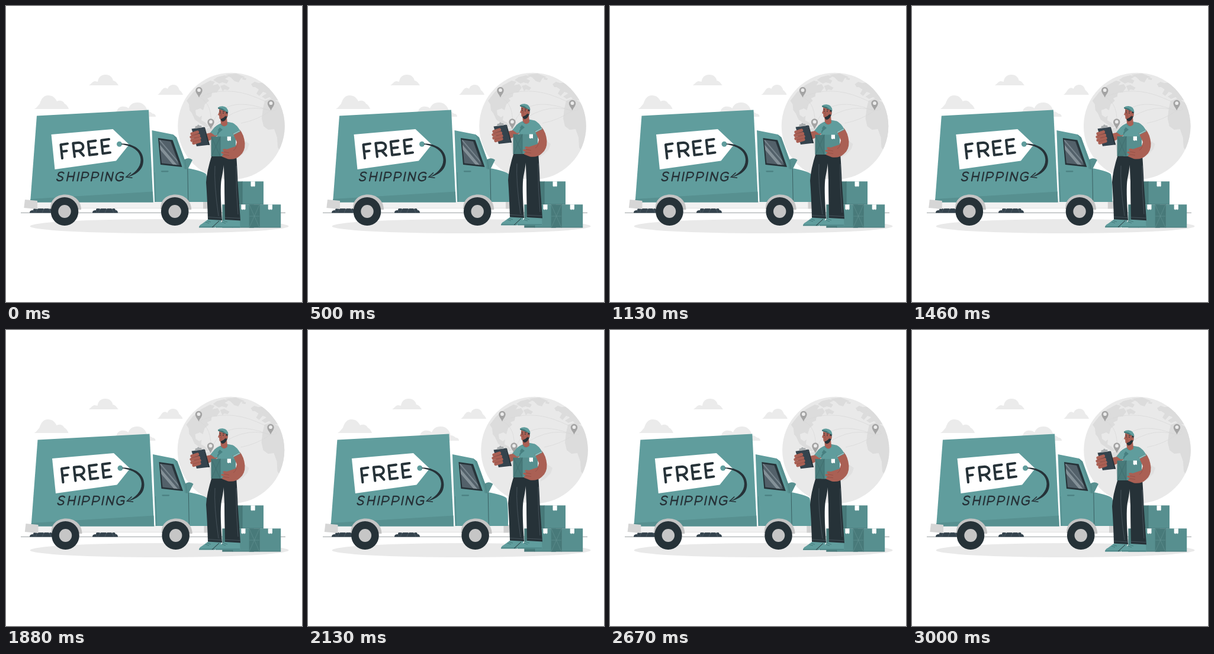
These frames come from a looping animation (500x500 px, 3.04 s). An HTML page with a canvas:

```html
<!DOCTYPE html>
<html lang="en">
<head>
<meta charset="utf-8">
<title>Free shipping</title>
<style>
html, body { margin: 0; width: 100%; height: 100%; overflow: hidden; background: #fff; }
canvas { display: block; width: 100vw; height: 100vh; }
</style>
</head>
<body>
<canvas id="stage" role="img" aria-label="FREE SHIPPING: delivery truck and courier"></canvas>
<script>
const canvas = document.getElementById('stage');
const ctx = canvas.getContext('2d');
const scale = Math.max(1, window.devicePixelRatio || 1);
canvas.width = canvas.height = 500 * scale;

const TEAL = '#609d9d', TEAL_DIM = '#579090', BOX = '#578f8f', BOX_SIDE = '#487a7a';
const INK = '#263238', SKIN = '#aa6054', SKIN_DIM = '#8e4b42';
const PALE = '#ebebeb', LAND = '#dcdcdc', CHROME = '#c4c4c4';
const LOOP = 3040, FPS = 24;

const paths = new Map();
function path(d) {
  if (!paths.has(d)) paths.set(d, new Path2D(d));
  return paths.get(d);
}
function fill(color, d) {
  ctx.fillStyle = color;
  ctx.fill(path(d));
}
function line(color, width, d) {
  ctx.strokeStyle = color;
  ctx.lineWidth = width;
  ctx.stroke(path(d));
}
function oval(color, x, y, rx, ry = rx) {
  ctx.fillStyle = color;
  ctx.beginPath();
  ctx.ellipse(x, y, rx, ry, 0, 0, Math.PI * 2);
  ctx.fill();
}
function rect(color, x, y, w, h) {
  ctx.fillStyle = color;
  ctx.fillRect(x, y, w, h);
}
function shifted(x, y, draw) {
  ctx.save();
  ctx.translate(x, y);
  draw();
  ctx.restore();
}

// Sideways shake in ten equal linear steps
const SHAKE = [0, -1, 2, -3, 3, -3, 3, -3, 2, -1, 0];
function shake(t, period) {
  const p = (t % period) / period * 10, i = Math.floor(p);
  return SHAKE[i] + (SHAKE[i + 1] - SHAKE[i]) * (p - i);
}
function bob(t) {
  const p = (t % 1500) / 1500;
  return -6 * (1 - Math.abs(1 - 2 * p));
}

function pin(x, y) {
  shifted(x, y, () => {
    fill('#a3a3a3', 'M0 12C-2 7-5.7 4-5.7 0A5.7 5.7 0 0 1 5.7 0C5.7 4 2 7 0 12Z');
    oval(PALE, 0, -.3, 2.9);
  });
}

function globe() {
  oval('#e9e9e9', 380.5, 203, 90.3);
  ctx.save();
  ctx.beginPath();
  ctx.arc(380.5, 203, 90.3, 0, Math.PI * 2);
  ctx.clip();
  fill(LAND, 'M305 160L316 146 330 134 345 126 353 128 349 134 358 132 362 138 356 146 348 146 347 153 340 156 343 160 336 166 333 176 328 173 320 176 321 184 327 188 331 185 330 193 337 197 343 204 338 205 329 199 319 192 314 181 310 176 309 166Z');
  fill(LAND, 'M350 125L357 120 369 117 377 119 370 123 376 126 373 131 365 129 360 131ZM362 135L369 133 378 138 375 142 369 141 366 144ZM371 116L389 114 404 120 397 122 393 129 386 127 380 121Z');
  fill(LAND, 'M336 208L348 204 363 210 376 219 373 232 362 244 357 262 347 254 344 233Z');
  fill(LAND, 'M400 121l6 1-1 3-6-1ZM414 132L420 128 429 131 436 139 444 143 440 147 434 145 428 152 423 148 427 141 421 137 417 137Z');
  fill(LAND, 'M427 130L437 129 451 147 460 159 453 159 445 154 438 157 432 153 440 148Z');
  fill(LAND, 'M437 160L449 156 461 163 474 182 475 224 464 246 459 239 458 222 453 208 443 209 435 203 432 190 434 173Z');
  fill('#e0e0e0', 'M394 233L404 228 411 233 408 242 399 251 391 256Z');
  line('#d7d7d7', .7, 'M326 154Q372 133 424 155T447 177M346 207Q363 145 447 177M346 207Q398 160 447 177M326 154Q350 164 346 207M397 198Q424 193 447 177');
  ctx.restore();
  pin(326, 142.5);
  pin(447.5, 164.5);
  pin(346, 196);
}

function clouds() {
  const main = 'M0 23C4 21 6 17 9 14C12 5 16 0 23 0C31 0 35 4 38 10C44 7 49 10 51 14C55 16 57 20 58 23Z';
  shifted(48, 151, () => fill(PALE, main));
  fill(PALE, 'M140 134C144 132 145 128 150 127C152 127 154 128 155 128C156 120 161 116 168 116C176 116 180 121 181 126C186 127 188 131 190 134Z');
  fill(PALE, 'M256 150C260 148 261 144 264 141C267 137 271 138 273 140C275 135 278 133 283 133C289 133 292 138 293 142C296 144 298 147 299 150Z');
  fill(PALE, 'M176 187C181 181 184 179 187 178C189 171 195 169 200 170C203 170 205 171 207 173C209 167 214 163 222 163C231 163 237 169 239 178C244 178 246 181 248 182C251 182 253 184 253 187Z');
}

function shrub(x) {
  shifted(x, 349, () => {
    fill('#34434d', 'M0 .5C0-3 2-4 6-4C6-7 8-8.5 11-8L13-6 16-8H22L24-6 26-8H31L33-6 36-8C38-7 39-5 39-4C42-4 43-2 43 .5Z');
    line('#63717b', .5, 'M6-4L8 0M13-6L10 0M24-6L21 0M33-6L36 0');
  });
}

function ground() {
  oval('#e9e9e9', 259, 372, 218.5, 12);
  line('#7d8488', .8, 'M25 349.3H472');
  shrub(40);
  shrub(146);
}

function wheel(x) {
  fill(CHROME, `M${x - 24} 343C${x - 25} 327 ${x - 13} 318.5 ${x + 1} 318.5C${x + 17} 318.5 ${x + 28} 330 ${x + 28} 344H${x + 20}Z`);
  oval(INK, x, 347, 23.3, 24);
  oval('#c6c6c6', x, 347, 10.7, 11);
}

function lettering() {
  ctx.lineCap = ctx.lineJoin = 'round';
  line(INK, 4.1, 'M104 232.5L92.5 234.3 95 257.2M93.8 246L102.5 244.7' +
    'M116 254.8L113.3 231.9 121 231C132 229.5 134 243 123.5 244.5L115 245.4M123.5 244.5L131 252.7' +
    'M151.5 227.6L138.7 229.2 141.2 251.8 154 250.1M140 240.3L150.5 239' +
    'M174 225L161.2 226.7 163.6 249.2 176 247.5M162.4 237.8L172.8 236.4');
  ctx.save();
  ctx.transform(1, 0, -.2, 1, 59.1, 0);
  line(INK, 2.3, 'M95 282.5C92 279.5 86 280.5 86 284.3C86 289 95 286.7 95 291.5C95 296 88 296.3 85.5 292.8' +
    'M103 280.8V295.3M113 280.8V295.3M103 288H113M120.5 280.8V295.3' +
    'M127 295.3V280.8H132C139 280.8 139 289.8 132 289.8H127' +
    'M144 295.3V280.8H149C156 280.8 156 289.8 149 289.8H144' +
    'M160.8 280.8V295.3M168 295.3V280.8L178 295.3V280.8' +
    'M196 283C192 279 184.5 281 184.5 288C184.5 295.5 192 297 196.5 293V288.5H191.5');
  ctx.restore();
  ctx.lineCap = 'butt';
  ctx.lineJoin = 'miter';
}

function cab() {
  fill(TEAL, 'M246.5 210L282 217 288 222 307 274Q333 279 338 284Q341 294 340.5 331H251Z');
  fill(TEAL_DIM, 'M282 217L288 222 307 274 302 273Z');
  fill(INK, 'M257 223L281.5 226.5 297.5 272 261 268Z');
  ctx.save();
  ctx.clip(path('M259 226L279.5 229 294 269 263 265.5Z'));
  rect('#53616a', 255, 220, 45, 55);
  line('#849198', 5, 'M252 229L292 276');
  line('#77858d', 2, 'M258 225L298 272');
  ctx.restore();
  line(INK, 1.2, 'M278 226.5L294 271');
  line('#36595c', .9, 'M306.8 274L307.8 331');
  line('#477b7c', .6, 'M251 281L253 331');
  ctx.lineCap = 'round';
  line('#4b8081', 2.2, 'M263 279.3H273.5');
  ctx.lineCap = 'butt';
  fill(TEAL_DIM, 'M302 259Q309 255 315 260L308 274Q304 278 300 274Z');
  line('#427475', .5, 'M302 259L304 275');
}

function truck() {
  fill('#f1f1f1', 'M50 330H340V342H50Z');
  line('#dddddd', .7, 'M50 341.7H340');
  fill(TEAL, 'M52 185.5L241 175.5 248.7 331.5H41Z');
  fill(TEAL_DIM, 'M41.3 326L248 313.5 248.7 331.5H41Z');
  fill('#d6d6d6', 'M32 327L53 329V343L30.3 341Z');
  fill('#d0d0d0', 'M333 329H343V342.5H333Z');
  cab();
  fill('#fff', 'M76.5 217L180.5 208 208 234 186 261.5 82.5 276Z');
  oval(TEAL, 191.5, 233.3, 4.5);
  fill(INK, 'M195 232.5C214 232 232 242 232 261C232 278 218 286 203 289.5C217 283 227.5 273 227.5 260C227.5 244 212 236 195 233.7Z');
  line(INK, 1.6, 'M211 281.5L203 289 213.5 290.3');
  lettering();
  wheel(99);
  wheel(285.2);
}

function parcel(x, y) {
  rect(BOX_SIDE, x, y, 18, 39);
  rect(BOX, x + 17.5, y, 36, 39);
  line('#3b6768', .6, `M${x + 17.5} ${y}v39M${x} ${y + 38.7}h53.5`);
  rect('#fff', x + 32, y, 7.2, 8);
  fill('#fff', `M${x + 32} ${y + 8}l2 1.3 2-1 1.6 1 1.6-1.3Z`);
}

function parcels() {
  parcel(381.5, 296.3);
  parcel(365.3, 335.3);
  parcel(410.7, 335.3);
  line('#6a9899', .5, 'M411 336L428 374M428 336L411 374M411 355H428');
}

function legs() {
  fill(TEAL, 'M326 374.5Q326 370 331 368L342 360H365L362 367 352 374.5Z');
  fill(TEAL, 'M353.5 374.5Q354 370 359 368L371 360H395L395.5 374.5Z');
  line('#3e7071', .8, 'M326 373.2H353M354 373.2H395M337 365L343 367M340 363L346 365M365 365L371 367M368 363L374 365');
  line(INK, 1, 'M348 374L360 363');
  fill(INK, 'M348 251H370Q368 273 364 292Q361 309 365 362L341 360.5Q340 325 338 298Q339 279 348 251Z');
  fill(INK, 'M367 251H389Q391 280 391.5 298L396 362.5 370 361Q369 320 369 297Z');
  line('#65717a', .5, 'M341 356.5L364.5 358M370 357.2L395.5 358.5M353 270Q351 300 359 355M389 270Q388 310 392 352');
}

function head() {
  fill(SKIN, 'M362 188H373L374 200Q369 207 363 199Z');
  fill(SKIN_DIM, 'M364 191L372 187Q371 195 364 196Z');
  fill(INK, 'M371 177L375 178 374 187 371 192Q367 197 363 192.5L364 187 369 185Z');
  fill(SKIN, 'M360 174L372 177 371 184Q370 189 367 191Q362 193 360.5 190L360 185 358 184 360 179Z');
  oval(SKIN, 372.5, 184, 2, 2.8);
  fill(INK, 'M362.5 191Q367 190 370.5 186L370.5 192Q366 197 363 193Z');
  oval(INK, 362, 180.5, .7, 1);
  oval(INK, 367, 181, .7, 1);
  line(INK, .9, 'M360.5 178L363 177.5M366 178L369 178.5');
  line(SKIN_DIM, .7, 'M364 181L362.7 185 364.5 185.5M362.5 188H365.5');
  fill(TEAL, 'M358 171.5Q361 169 366 169.3Q375 170 375.5 180L370 177.5Q365 174 358.5 173.5Z');
  fill('#3e7273', 'M358 171.5L366 173.5 373 179 368 177 358.5 173.5Z');
}

function clipboard() {
  fill(SKIN, 'M350 213L337 216 330 219 336 231 348 225 357 219Z');
  fill('#34434d', 'M313.5 207.5L334.5 204.5 344 234.5 322 237Z');
  fill(INK, 'M334.5 204.5L336 205 344 234.5 342 234.7Z');
  fill('#a8acae', 'M319 207L320 203 323 202.5Q324 199 327 202L330 202 331 205.5Z');
  ctx.lineCap = 'round';
  line(SKIN, 5.2, 'M314 216L323.5 213M313 221.5L325.5 218.5M314 227L327 223.5M317 231.5L327 228.5');
  line(SKIN_DIM, .6, 'M313 219.3L325 215.8M313 224.5L326.5 221.3M315.5 229.5L327.5 226.2');
  ctx.lineCap = 'butt';
}

function courier() {
  legs();
  fill(TEAL, 'M361 199Q354 202 351 207L345 214 354 220 357 219V254H387L388 219 396 213Q389 199 381 197L373 195.5Z');
  fill('#477f80', 'M361 205L366 209 360 214 357 219 357 211Z');
  line('#3e7273', .6, 'M362 199Q369 208 374 196M384 203L388 217');
  head();
  clipboard();
  fill(TEAL, 'M353 204L345.5 213.5 354 219.5 359 211Z');
  rect(BOX_SIDE, 346.5, 220.5, 16, 33.5);
  rect(BOX, 362, 220.5, 26, 33.5);
  line('#3b6768', .6, 'M362 220.5V254M347 221L362 254M362 221L347 254');
  fill('#fff', 'M373.7 220.5H380V228L378 227 376 228 373.7 227Z');
  fill(SKIN, 'M383 214.5L395 209Q402 217 403.5 232Q404 246 395 253Q388 260 375 258.5L365 254.5Q364 252 368 251L363 248Q364 245 369 246L366 243Q367 240 373 242L388 237 390 230Z');
  line(SKIN_DIM, .7, 'M368 246.3L377 248M367 251L377 252.5M389 235Q389 241 384 244');
  fill(TEAL, 'M382 197Q391 201 396 212L384 218Z');
  line('#e1eaea', .7, 'M384 216.5L395.2 210.7');
}

function render(t) {
  ctx.setTransform(scale, 0, 0, scale, 0, 0);
  rect('#fff', 0, 0, 500, 500);
  shifted(shake(t, 1500), 0, () => { globe(); clouds(); });
  ground();
  shifted(shake(t, 3000), 0, truck);
  parcels();
  shifted(0, bob(t), courier);
}

const start = performance.now();
function tick() {
  const now = (performance.now() - start) % LOOP;
  const step = Math.floor(now * FPS / 1000 + .2);
  render(Math.min(step, 72) * 1000 / FPS);
  requestAnimationFrame(tick);
}
tick();
</script>
</body>
</html>
```
